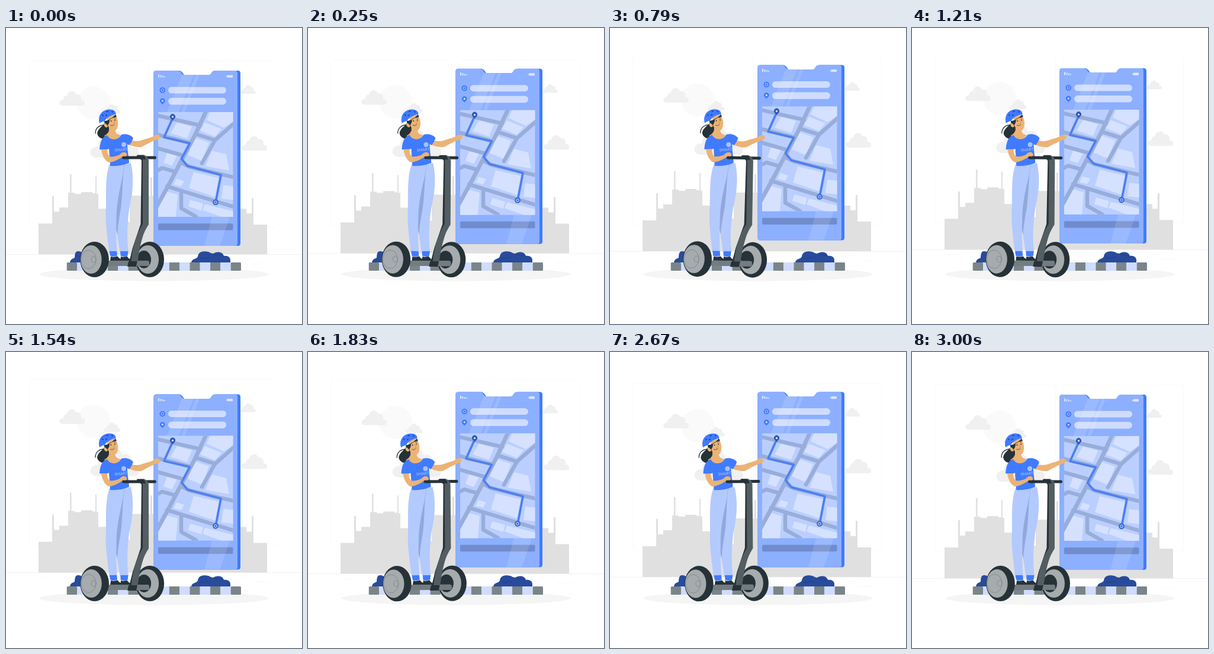
These frames come from a looping animation (500x500 px, 3.04 s). An HTML page:

```html
<!DOCTYPE html>
<html lang="en">
<head>
<meta charset="utf-8">
<title>City ride</title>
<style>
html, body { margin: 0; width: 100%; height: 100%; overflow: hidden; background: #fff; }
svg { display: block; width: 100%; height: 100%; }
.blue { fill: #407bff; }
.skin { fill: #ebb376; }
.dark { fill: #263238; }
.line { fill: none; stroke-linecap: round; stroke-linejoin: round; }
</style>
</head>
<body>
<svg viewBox="0 0 500 500">
  <defs>
    <path id="cloud" d="M5 25C-2 24-1 15 7 15C7 10 10 8 13 8C15-2 27-1 28 6C34 4 38 9 37 16C41 15 43 18 43 21C43 24 41 25 39 25Z"/>
    <path id="route" d="M281.500 152L267 184L310.500 194.200L296.500 220.500L306.500 232.500L363 247.700L354.500 292"/>
    <clipPath id="face"><path d="M253 71.500H290Q294 71.500 296 75Q298 79 301 79H342Q345 79 347 75Q349 71.500 352 71.500H387Q391 71.500 391 76V363Q391 367.500 387 367.500H253Q249 367.500 249 363V76Q249 71.500 253 71.500Z"/></clipPath>
    <clipPath id="mapArea"><path d="M257 141.500H383.500V318.500H257Z"/></clipPath>
  </defs>

  <ellipse cx="250" cy="416" rx="193.500" ry="11.500" fill="#f5f5f5"/>

  <g id="city">
    <g fill="none" stroke="#f8f8f8" stroke-width=".7">
      <rect x="39" y="55" width="203.500" height="282" rx="3"/>
      <rect x="255" y="55" width="203.500" height="282" rx="3"/>
      <path d="M0 382.300H500" stroke="#ebebeb"/>
      <path d="M400 389.500H416M416 398H448M60 391H76"/>
    </g>
    <circle cx="148" cy="126.500" r="28" fill="#fafafa"/>
    <g fill="#f0f0f0">
      <use href="#cloud" transform="translate(90 106)"/>
      <use href="#cloud" transform="translate(165 128) scale(.66)"/>
      <use href="#cloud" transform="translate(142 171) scale(1.92)"/>
      <use href="#cloud" transform="translate(396 96) scale(.6)"/>
      <use href="#cloud" transform="translate(398 182)"/>
    </g>
    <path fill="#e0e0e0" d="M55 382V330H78V284H81V310H90V303H105V278H108V247H110.500V278H116V280H127V277H146V279H151V250H153V280H156V305H172V327H209V283H244V252H247V283H300V305H406V313H415V287H418V332H441V382Z"/>
  </g>

  <g id="phone">
    <path class="blue" d="M253 71.500H292Q296 71.500 299 76L301 79H347Q348 71.500 355 71.500H392Q396 71.500 396 76V363Q396 367.500 392 367.500H253Z"/>
    <g clip-path="url(#face)">
      <path fill="#8cafff" d="M249 71H391V368H249Z"/>
      <g fill="#fff" opacity=".85">
        <path d="M257 78h2v5h-2zM260.500 79h2v4h-2zM264 80h1.800v3H264zM267 81h1.800v2H267z" opacity=".8"/>
        <rect x="373.500" y="79" width="9.500" height="4.300" rx=".8" opacity=".8"/>
        <path d="M372 80.200h1v2h-1z"/>
      </g>
      <rect x="274" y="99" width="98" height="11" rx="5.500" fill="#cfdcff"/>
      <rect x="274" y="117.500" width="98" height="11.500" rx="5.700" fill="#cfdcff"/>
      <circle cx="264.300" cy="104.500" r="4.800" class="blue"/>
      <circle cx="264.300" cy="104.500" r="2.300" fill="#407bff" stroke="#bfd2ff" stroke-width="1"/>
      <path class="blue" d="M264.300 128.700C262 126 259.800 124.500 259.800 122.500A4.500 4.300 0 0 1 268.800 122.500C268.800 124.500 266.500 126 264.300 128.700Z"/>
      <circle cx="264.300" cy="122.500" r="1.600" fill="#cfdcff"/>

      <g clip-path="url(#mapArea)">
        <path fill="#bacfff" d="M257 141H384V319H257Z"/>
        <path fill="#d5e1ff" d="M289 159L314 166L306 186L278 177ZM319 185L343 193L331 224L307 214ZM345 141H384V157L368 168L339 155ZM336 159L364 170L353 183L328 173ZM348 207L372 213L377 240L337 233ZM272 211L289 215L280 232L266 227ZM288 254L301 258L296 267L283 264ZM317 243L361 253L354 285L309 270ZM367 265L384 267V290L364 288ZM272 276L290 281L287 319H257V304ZM311 290L333 296L330 308L308 301ZM336 297L384 309V319H365L332 307Z"/>
        <g class="line" stroke="#98add9" stroke-width="6.500">
          <path d="M254 147L328 164M254 179L310 193.500M322 179L353 189L386 160M353 189L331 228"/>
          <path d="M338 140L319 181L296 224L274 266L254 302" stroke-width="7"/>
          <path d="M254 202L300 215M254 241L264 236L285 242M298 228L310 234L386 252M272 267L386 302M296 276V304L321 318"/>
        </g>
        <use href="#route" class="line" stroke="#6d90e0" stroke-width="4.200"/>
        <use href="#route" class="line" stroke="#407bff" stroke-width="2"/>
        <path fill="#2e58b8" d="M281.500 156L278 152A4.500 4.500 0 1 1 285 152Z"/>
        <circle cx="281.500" cy="149.500" r="1.700" fill="#cfdcff"/>
        <circle cx="354" cy="294" r="4.800" fill="#315fc5"/>
        <circle cx="354" cy="294" r="2.500" fill="#407bff" stroke="#cfdcff"/>
      </g>
      <rect x="257" y="329.700" width="126.500" height="11.300" rx="2" fill="#708ccc"/>
      <g fill="#fff" opacity=".13">
        <path d="M300 71H320L292 141.500H272Z"/>
        <path d="M324 71H330L302 141.500H296Z"/>
        <path d="M378 318.500L361 368H335L348 318.500Z"/>
      </g>
    </g>
  </g>

  <path fill="#284b9c" d="M108 396C109 390 113 390 116 388C116 380 118 377 122 377C127 377 130 380 131 386L134 396ZM313 396C314 389 322 391 324 386C325 379 331 376.500 338 377.500C343 377.500 346 381 350 381C356 377 366 377.500 368 385C374 384 379 387 379 392V396Z"/>
  <path class="line" stroke="#1f3d83" stroke-width=".8" d="M327 389C336 390 338 386 344 388M352 384C357 381 360 385 367 385"/>
  <g id="curb"></g>

  <g id="rider">
    <ellipse cx="243" cy="391" rx="24" ry="30" class="dark"/>
    <ellipse cx="239.500" cy="391" rx="18.500" ry="24" fill="#a6abad"/>
    <ellipse cx="233" cy="391" rx="12" ry="15" class="dark"/>
    <path fill="#737c80" d="M164 393H239Q242 393 242 397.500Q242 402 239 402H164Z"/>

    <path class="dark" d="M177 386C183 388 187 385 189 386C190 389 195 390 196 393H176ZM194 386C199 388 203 385 205 386C206 389 210 390 211 393H193Z"/>
    <path class="blue" d="M174.500 376H187L188 385Q181 387 176 385ZM193 376H206.500L205.500 385Q199 387 193.500 385Z"/>
    <path fill="#90a8da" d="M190 231H210L205 300L189 352L183 330Z"/>
    <path fill="#b3caff" d="M175 230C168 247 169 275 169 300C167 325 171 350 174 377H187.500C186 358 186 340 186.500 320C187 292 193 268 202 229Z"/>
    <path fill="#b3caff" d="M199 231C197 255 197 280 194 304C190 328 186 346 190 362L192 377H206.500C204 350 205 332 208 306C214 280 217 255 211 228Z"/>
    <path class="line" stroke="#8faae8" stroke-width=".6" d="M200 231L196 262"/>

    <path class="skin" d="M206 188C214 191 222 192 228 190C236 187 243 186 249 183C251 180 255 179 259 181C262 184 259 189 255 188C248 191 238 196 229 201C220 202 211 199 206 196Z"/>
    <path class="dark" d="M167 160C162 167 155 170 154 178C155 185 163 189 170 187C175 184 176 178 174 171L176 160Z"/>
    <path class="line" stroke="#263238" stroke-width="1.300" d="M168 164C159 163 151 168 151 178"/>
    <path class="skin" d="M175 166C175 174 172 179 166 182C174 192 189 190 194 181C188 180 185 178 184 172Z"/>
    <path class="blue" d="M171 181C175 190 189 191 195 180C202 178 211 180 215 186C213 191 211 195 208 198L205 196C205 209 208 220 208 228Q193 234 176 233L174 204C167 207 162 206 158 205C159 192 162 184 171 181Z"/>
    <path class="skin" d="M161 205C162 214 166 223 173 227C181 227 190 222 196 218C203 219 206 215 203 212C199 209 195 210 192 214C186 217 179 218 175 217C171 213 171 208 171 205Z"/>
    <text x="183.500" y="208.800" transform="rotate(-5 183 209)" font-family="Lato, sans-serif" font-size="6.500" fill="#b6ccff">SMART</text>
    <circle cx="199" cy="197" r="4" fill="#a7c1ff"/>

    <path class="skin" d="M171 154C171 165 174 173 182 174C188 173 190 166 189 158C188 151 185 147 182 147L171 150Z"/>
    <path class="dark" d="M166 157C173 157 180 152 185 146L187 150C183 151 178 152 175 155C175 160 173 163 171 165C168 164 166 161 166 157Z"/>
    <path class="skin" d="M169 162C166 159 164 163 167 166.500C169 169 172 168 172 165Z"/>
    <path class="blue" d="M158 161C154 146 164 137.500 175 137.500C182 137.500 186 141 185.500 146C178 147 171 150.500 166.500 157Q162 158 158 161Z"/>
    <path class="line" stroke="#244aa0" stroke-width="2" d="M163 147L164 148M170 141L172 141M179 141L180 142M169 148L170 147"/>
    <ellipse cx="177.500" cy="157" rx=".8" ry="1.200" class="dark"/>
    <ellipse cx="184" cy="155.500" rx=".8" ry="1.200" class="dark"/>
    <path class="line" stroke="#263238" stroke-width=".7" d="M175 154L178 152.800M182.500 152L185 152M176.500 164.500Q180 166.500 183 163"/>
    <path class="line" stroke="#cf8c50" stroke-width=".7" d="M181.500 157L183.500 161L181.500 161.500"/>

    <path class="line" stroke="#263238" stroke-width="5" d="M198.500 219H251.500"/>
    <path class="dark" d="M222 214.500H234L236 224V333L217 403H206L214 371L227.500 331L229 224Z"/>
    <path fill="#535e62" d="M228 216Q240 213 241 224V332C231 347 226 363 221.500 403H211C212 375 219 350 231 331V224Z"/>
    <path class="dark" d="M221 215H231Q235 216 236 222H228Q225 220 221 219Z"/>
    <path class="skin" d="M195 212C199 208 204 210 204 214C204 217 200 217 196 216Z"/>
    <path class="dark" d="M207 394H223L220 403H205Z"/>
    <path fill="#737c80" d="M222 393H239Q242 393 242 397.500Q242 402 239 402H220Z"/>

    <ellipse cx="149.500" cy="391" rx="24.300" ry="30" class="dark"/>
    <ellipse cx="143.800" cy="391" rx="17.800" ry="24" fill="#a6abad"/>
    <g fill="none" stroke="#7c8488" stroke-width=".8">
      <ellipse cx="139.500" cy="391" rx="12.500" ry="15.500"/>
      <ellipse cx="148" cy="391" rx="4" ry="5.200"/>
    </g>
  </g>
</svg>
<script>
const LOOP = 3040, FPS = 24;
const byId = id => document.getElementById(id);
const city = byId("city"), phone = byId("phone"), rider = byId("rider");

const SEGMENTS = 17, CURB_LEFT = 102.7, CURB_WIDTH = 294.3;
byId("curb").innerHTML = Array.from({ length: SEGMENTS }, (_, i) => {
  const w = CURB_WIDTH / SEGMENTS;
  const radius = i % (SEGMENTS - 1) ? 0 : 1.5;
  return `<rect x="${CURB_LEFT + i * w}" y="396" width="${w}" height="14" rx="${radius}" fill="${i % 2 ? "#cfdcff" : "#7b8589"}"/>`;
}).join("");

// Linear rise and fall: 0 at the ends of each period, 1 halfway
const triangle = (t, period) => 1 - Math.abs(1 - 2 * ((t / period) % 1));

function draw(ms) {
  const t = Math.floor((ms % LOOP + 5) * FPS / 1000) / FPS;
  city.setAttribute("transform", `translate(0 ${0.2 - 10 * triangle(t, 3)})`);
  phone.setAttribute("transform", `translate(0 ${0.5 - 10 * triangle(t, 1.5)})`);
  const tilt = 2 * triangle(t + 0.75, 3) - 1;
  rider.setAttribute("transform", `rotate(${tilt} 196 279)`);
}

const start = performance.now();
function tick() {
  draw(performance.now() - start);
  requestAnimationFrame(tick);
}
draw(0);
requestAnimationFrame(tick);
</script>
</body>
</html>
```
